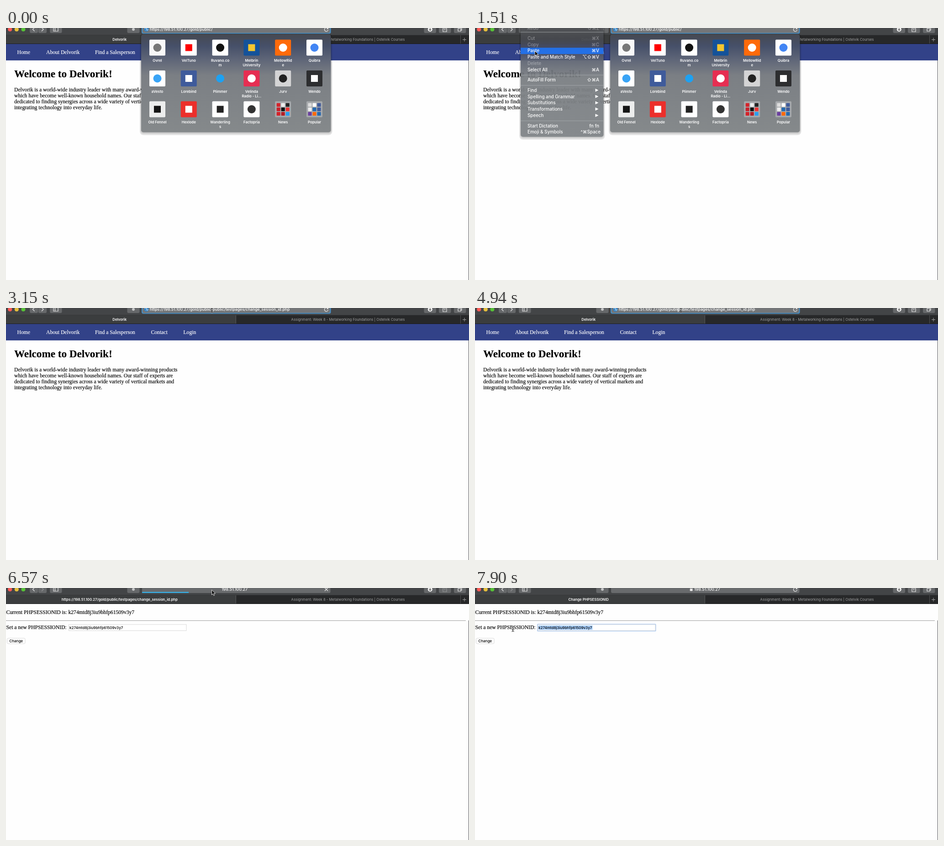
An HTML page that plays this animation: 1014 by 552 pixels, repeating every 8 s.

```html
<!DOCTYPE html>
<html lang="en">
<head>
<meta charset="utf-8">
<title>Session page</title>
<style>
  html, body { margin: 0; width: 100%; height: 100%; overflow: hidden; background: #fff; }
  svg { display: block; width: 100%; height: 100%; }
  text { font-family: Inter, "DejaVu Sans", sans-serif; white-space: pre; }
  .serif { font-family: "Liberation Serif", serif; font-size: 11.64px; stroke: #000; stroke-width: .18; }
  .title { font-size: 23.15px; font-weight: 700; }
  .nav { fill: #fff; stroke: #fff; }
  .tab { font-size: 7.75px; font-weight: 600; fill: #fff; text-anchor: middle; }
  .tab.idle { font-weight: 400; fill: #a2a3a4; }
  .url { font-size: 8.65px; font-weight: 500; fill: #fff; }
  .host { font-size: 9px; }
  .label { font-size: 7.85px; font-weight: 600; fill: #fff; text-anchor: middle; }
  .item { font-size: 9.8px; font-weight: 500; fill: #fff; }
  .off { opacity: .36; }
  .form { font-size: 8px; font-weight: 500; }
  .line { fill: none; stroke: #e8e8e8; stroke-width: 1.2; }
  .end { text-anchor: end; }
  .mid { text-anchor: middle; }
</style>
</head>
<body>
<svg id="stage" viewBox="0 0 1014 552" preserveAspectRatio="none"></svg>
<script>
const DURATION = 8000;
const HOST = '198.51.100.27';
const HEAD = `https://${HOST}/gold/public/`;
const TAIL = 'public/testpages/change_session_id.php';
const TOKEN = 'k274mtd8j3iu9bhfp61509v3y7';
const BRAND = 'Delvorik';
const stage = document.getElementById('stage');

const text = (x, y, str, cls, extra = '') =>
  `<text x="${x}" y="${y}" class="${cls}" ${extra}>${str}</text>`;
const rect = (x, y, w, h, fill, r = 0, extra = '') =>
  `<rect x="${x}" y="${y}" width="${w}" height="${h}" fill="${fill}" rx="${r}" ${extra}/>`;
const dot = (x, y, r, fill) => `<circle cx="${x}" cy="${y}" r="${r}" fill="${fill}"/>`;
const line = (d, extra = '') => `<path class="line" d="${d}" ${extra}/>`;
// Shown during the listed "from-to" spans of the loop.
const during = (spans, body, extra = '') => `<g data-show="${spans}" ${extra}>${body}</g>`;
const gradient = (id, y1, y2, stops) =>
  `<linearGradient id="${id}" gradientUnits="userSpaceOnUse" x1="0" x2="0" y1="${y1}" y2="${y2}">` +
  stops.map(([at, c]) => `<stop offset="${at}" stop-color="${c}"/>`).join('') + '</linearGradient>';
// Panel hanging from the top with a soft two-step shadow.
const panel = (x, y, w, h, fill) =>
  rect(x - 3, y - 1, w + 6, h + 7, '#000', 8, 'opacity=".11"') +
  rect(x - 1.5, y - 1, w + 3, h + 4, '#000', 7, 'opacity=".1"') +
  rect(x, y, w, h, fill, 5);

function homePage() {
  const links = [[24.5, 'Home'], [88, 'About ' + BRAND], [195, 'Find a Salesperson'],
                 [317.5, 'Contact'], [388.5, 'Login']];
  const copy = [BRAND + ' is a world-wide industry leader with many award-winning products',
    'which have become well-known household names. Our staff of experts are',
    'dedicated to finding synergies across a wide variety of vertical markets and',
    'integrating technology into everyday life.'];
  return rect(0, 35, 1014, 36, '#324288') +
    links.map(([x, s]) => text(x, 57, s, 'serif nav')).join('') +
    text(18, 108, `Welcome to ${BRAND}!`, 'serif title') +
    copy.map((s, i) => text(18, 139 + i * 13.1, s, 'serif')).join('');
}

function formPage() {
  return text(0.5, 57, 'Current PHPSESSIONID is: ' + TOKEN, 'serif') +
    rect(0, 71, 1007, 1, '#9c9c9c') +
    text(0.5, 90, 'Set a new PHPSESSIONID:', 'serif') +
    during('7460-8000', rect(136, 78.5, 260.5, 16.5, '#a9caf6', 1.5)) +
    rect(137.5, 80, 257.5, 13.5, '#fff', 0, 'stroke="#cfcfcf" stroke-width=".8"') +
    '<rect id="picked" y="82" height="9.6" fill="#a9d0fd"/>' +
    text(139, 90, TOKEN, 'form') +
    rect(2.5, 110, 39.5, 12, '#fff', 2.5, 'stroke="#cfcfcf" stroke-width=".8"') +
    text(22.2, 119, 'Change', 'form mid');
}

function toolbar() {
  const buttons = [[52, 18], [70.7, 18.3], [96, 26.5], [265.5, 27], [915.5, 26.5], [948, 26.5], [981, 26.5]];
  const forward = 'M78 -1L82 3L78 7', share = 'M959 1H957V8H965V1H963M961 5V-2', dim = 'opacity=".35"';
  return rect(0, 0, 1014, 16, '#434547') + rect(0, 15.5, 1014, 1, '#2a2b2c') +
    ['#fc5b57', '#e5bf3c', '#57c038'].map((c, i) => dot(8.7 + i * 14.6, 3, 4.6, c)).join('') +
    buttons.map(([x, w]) => rect(x, -6, w, 17, '#66686a', 3)).join('') +
    line('M62.5 -1L58.5 3L62.5 7') +
    during('0-6270', line(forward)) + during('6270-8000', line(forward, dim)) +
    line('M104 -1H114V7H104ZM107.5 -1V7') +
    dot(279, 3, 3, '#c4c5c6') +
    dot(928.8, 3, 5, '#f2f2f2') + line('M928.8 0V5M926.5 3L928.8 5.4L931.1 3', 'style="stroke:#555"') +
    during('0-6270 6860-8000', line(share)) + during('6270-6860', line(share, dim)) +
    line('M990 1H996V7H990ZM992 1V-1H998V5H996') +
    during('0-6270', rect(297, -8, 414.5, 20.5, '#4590c9', 4) + rect(299, -8, 410.5, 18.7, '#747678', 3) +
      dot(307.5, 3, 5, '#2f7fc4') + line('M303.5 1Q306 -1 308 1T306 5M309 6L311.5 3', 'style="stroke:#b8dcf2"') +
      '<text id="address" class="url" x="315" y="6.3"></text><rect id="caret" y="-1" width="1" height="10" fill="#fff"/>') +
    during('6270-8000', rect(298, -8, 412.5, 19, '#696b6d', 3)) +
    during('6270-6860', rect(298, 8.6, 0, 2.3, '#35b3ec', 0, 'id="progress"') +
      text(500.7, 6.4, HOST, 'url host mid') + line('M698 -.5L705 6.5M705 -.5L698 6.5')) +
    during('6860-8000', rect(470.7, 2, 5.8, 4.6, '#eee', .8) + line('M472 2V0Q473.6 -2 475.2 0V2') +
      text(479.8, 6.4, HOST, 'url host')) +
    during('0-6270 6860-8000', line('M704.6 1A4 4 0 1 0 705.4 4M705.4 -1.5V1.6H702.2'));
}

function tabs() {
  return rect(0, 16, 1014, 19, '#272829') + rect(0, 16, 503, 19, '#3b3d3e') +
    rect(503, 16, 1, 19, '#58595a') + rect(995, 16, 1, 19, '#505152') + rect(0, 34.2, 1014, .8, '#161718') +
    line('M1000 25.5H1008M1004 21.5V29.5', 'style="stroke:#a8a9aa;stroke-width:1"') +
    during('0-6560', text(248.8, 28.4, BRAND, 'tab')) +
    during('6560-6860', text(248.8, 28.4, HEAD + TAIL.slice(7), 'tab')) +
    during('6860-8000', text(248.8, 28.4, 'Change PHPSESSIONID', 'tab')) +
    text(749, 28.4, 'Assignment: Week 8 - Metalworking Foundations | Ostelvik Courses', 'tab idle');
}

function favorites() {
  // label lines, tile colour, mark colour, mark shape
  const sites = [
    ['Ovrel', '#f8f8f8', '#777', 'o'], ['VelTuno', '#fff', '#f00', 's'], ['Ruvano.co|m', '#fff', '#111', 'o'],
    ['Melbrin|University', '#14529a', '#f3c62f', 's'], ['MellowRid|e', '#ff6a0a', '#fff', 'o'], ['Quibra', '#fff', '#4285f4', 'o'],
    ['aVesto', '#fff', '#39a4f6', 'o'], ['Lorebind', '#3f5b9b', '#fff', 's'], ['Plimmer', 'none', '#1da1f2', 'o'],
    ['Velinda|Radio - Li...', '#e62e52', '#fff', 'o'], ['Jurv', '#d4d4d5', '#222', 'o'], ['Wendo', '#2d2e30', '#fff', 's'],
    ['Old Fennel', '#eceded', '#151515', 's'], ['Hexlode', '#ec2f2b', '#fff', 's'], ['Wanderling|s', '#fff', '#222', 's'],
    ['Factopria', '#fff', '#333', 'o'], ['News', '#a6a9ac', '', 'f'], ['Popular', '#a6a9ac', '', 'f']];
  const folders = [['#d5222a', '#eee', '#222', '#c8202b', '#111', '#e33', '#d5222a', '#b51f26', '#2a9df0'],
                   ['#ddd', '#fff', '#3f5b9b', '#eee', '#2469b0', '#3f5b9b', '#6b3fa0', '#ff6a0a', '#2469b0']];
  const tile = ([name, back, ink, shape], i) => {
    const x = 331.5 + (i % 6) * 68.8, y = 25.5 + Math.floor(i / 6) * 67.5, cy = y + 17.5;
    let mark = shape === 'o' ? dot(x, cy, 9, ink) : rect(x - 7.5, cy - 7.5, 15, 15, ink);
    if (shape === 'f') mark = folders[i - 16].map((c, k) =>
      rect(x - 14 + k % 3 * 10, y + 4 + Math.floor(k / 3) * 9.8, 8, 8, c, 1)).join('');
    return rect(x - 17.5, y, 35, 35, back, 2) + mark +
      name.split('|').map((s, k) => text(x, y + 48.5 + k * 10, s, 'label')).join('');
  };
  return panel(296, 13.5, 415.5, 215, 'url(#sheet)') + sites.map(tile).join('');
}

function editMenu() {
  // centre line, name, shortcut (">" opens a submenu), disabled
  const items = [[0, 'Redo', '⇧⌘Z', 1], [22, 'Cut', '⌘X', 1], [36, 'Copy', '⌘C', 1], [49.8, 'Paste', '⌘V'],
    [63.6, 'Paste and Match Style', '⌥⇧⌘V'], [77.4, 'Delete', '', 1], [91.2, 'Select All', '⌘A'],
    [113.8, 'AutoFill Form', '⇧⌘A'], [136.2, 'Find', '>'], [150, 'Spelling and Grammar', '>'],
    [163.8, 'Substitutions', '>'], [177.6, 'Transformations', '>'], [191.4, 'Speech', '>'],
    [214, 'Start Dictation', 'fn fn'], [227.8, 'Emoji &amp; Symbols', '^⌘Space']];
  const row = ([y, name, key, off]) => `<g${off ? ' class="off"' : ''}>` + text(115, y + 3.6, name, 'item') +
    (key === '>' ? `<path d="M263.5 ${y - 3.5}L270.5 ${y}L263.5 ${y + 3.5}Z" fill="#fff"/>`
                 : text(key.endsWith('e') ? 275 : 272, y + 3.6, key, 'item end')) + '</g>';
  const bar = y => rect(100, y, 181.5, 13.8, '#2470e6');
  return `<g opacity=".95">${panel(100, -10, 181.5, 248.5, 'url(#menu)')}</g>` +
    [8.5, 102.5, 125, 202.8].map(y => rect(100, y, 181.5, 1.2, '#a9acae', 0, 'opacity=".7"')).join('') +
    during('1070-1370', bar(56.8)) + during('1370-1660', bar(43.2)) +
    items.map(row).join('');
}

const beam = 'M-2.5 -5.5Q0 -5.5 0 -3.5Q0 -5.5 2.5 -5.5M0 -3.5V3.5M-2.5 5.5Q0 5.5 0 3.5Q0 5.5 2.5 5.5';
const cursors =
  '<g id="arrow"><path d="M0 0V11L2.6 8.7L4.4 12.7L6.2 11.9L4.5 8H8Z" fill="#111" stroke="#fff" stroke-width=".8"/></g>' +
  `<g id="beam" fill="none"><path d="${beam}" stroke="#fff" stroke-width="2" opacity=".7"/>` +
  `<path d="${beam}M-1.5 1.5H1.5" stroke="#111"/></g>`;

stage.innerHTML = '<defs>' +
  gradient('sheet', 14, 228, [[0, '#464951'], [.12, '#465069'], [.26, '#5f6678'], [.42, '#7b7f84'], [1, '#85898b']]) +
  gradient('menu', 0, 238, [[0, '#525457'], [.1, '#47494e'], [.2, '#454c66'], [.3, '#606674'], [.45, '#7b7f83'], [1, '#808487']]) +
  '</defs>' + rect(0, 0, 1014, 552, '#fefefe') +
  during('0-6560', homePage()) + during('6560-8000', formPage()) +
  rect(1013, 71, 1, 481, '#55565a') +
  toolbar() + tabs() +
  during('0-1810', favorites()) +
  during('450-1810', editMenu(), 'id="edit"') +
  cursors;

const pointer = [[0, 120, -30, 'arrow'], [770, 120, 3, 'arrow'], [920, 124, 24, 'arrow'], [1070, 131, 67, 'arrow'],
  [1370, 131, 50, 'arrow'], [1960, 190, 45, 'arrow'], [2110, 320, 28, 'arrow'], [2250, 410, 14, 'arrow'],
  [2400, 446, 7, 'beam'], [2550, 448, 6, 'beam'], [2850, 451, 5, 'beam'], [6270, 450.5, 4, 'arrow'],
  [7010, 400, 60, 'arrow'], [7160, 340, 112, 'arrow'], [7310, 290, 100, 'arrow'], [7460, 270, 87, 'beam'],
  [7600, 190, 88, 'beam'], [7750, 120, 89, 'beam'], [7900, 83, 90, 'beam']];
const deletions = [4640, 4940, 5090, 5230, 5380, 5820, 6120];
const loading = [[0, 0], [6270, 30], [6420, 62], [6560, 102], [6710, 160]];

const timed = [...stage.querySelectorAll('[data-show]')].map(el => ({
  el, spans: el.dataset.show.split(' ').map(s => s.split('-').map(Number))
}));
const byId = id => document.getElementById(id);
const [address, caret, progress, picked, edit] = ['address', 'caret', 'progress', 'picked', 'edit'].map(byId);
const within = (t, spans) => spans.some(([a, b]) => t >= a && t < b);
const latest = (t, steps) => steps.filter(s => s[0] <= t).pop();
const show = (el, on) => { el.style.display = on ? '' : 'none'; };

function drawAddress(t) {
  const head = HEAD.slice(0, HEAD.length - deletions.filter(d => d <= t).length);
  const full = t < 1810 ? HEAD : head + TAIL;
  if (address.textContent !== full) address.textContent = full;
  show(caret, within(t, [[1810, 2250], [2550, 3150], [4350, 6270]]));
  if (t >= 1810 && t < 6270) {
    const before = t >= 4350 ? head.length : full.length;
    caret.setAttribute('x', 315 + address.getSubStringLength(0, before));
  }
}

function draw(t) {
  timed.forEach(({ el, spans }) => show(el, within(t, spans)));
  edit.style.opacity = t < 1660 ? 1 : .45;
  drawAddress(t);
  progress.setAttribute('width', latest(t, loading)[1]);

  const [, x, y, shape] = latest(t, pointer);
  for (const id of ['arrow', 'beam']) {
    show(byId(id), id === shape);
    byId(id).setAttribute('transform', `translate(${x} ${y})`);
  }
  const left = Math.max(139, x);
  picked.setAttribute('x', left);
  picked.setAttribute('width', t >= 7460 ? Math.max(0, 257.5 - left) : 0);
}

const start = performance.now();
function tick() {
  draw((performance.now() - start) % DURATION);
  requestAnimationFrame(tick);
}
draw(0);
requestAnimationFrame(tick);
</script>
</body>
</html>
```
